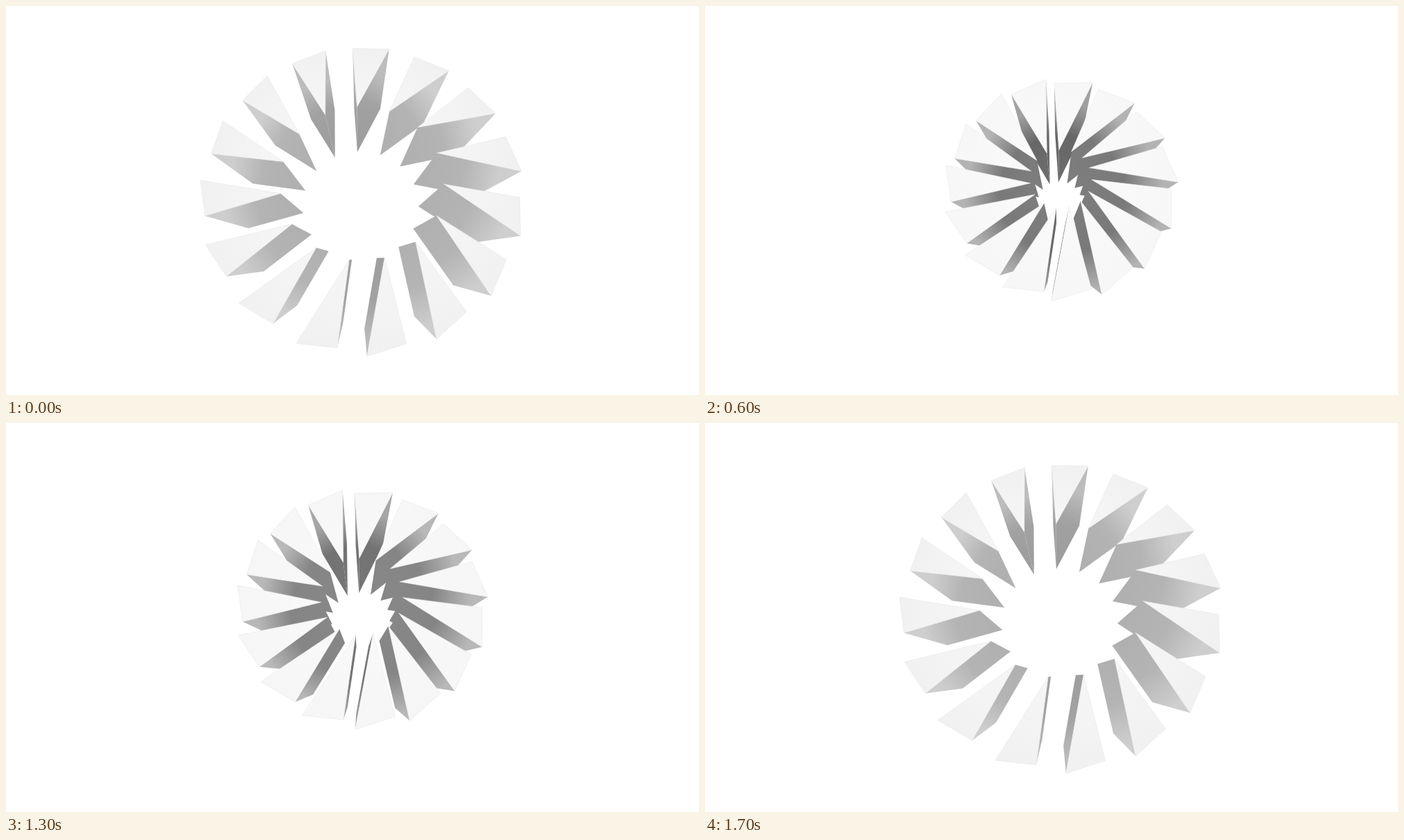
An HTML page with a canvas for the animation above (1.8 s loop, 998 by 561 pixels).

```html
<!DOCTYPE html>
<html lang="en">
<head>
<meta charset="utf-8">
<title>Opening ring of wedges</title>
<style>
  html, body { margin: 0; width: 100%; height: 100%; overflow: hidden; background: #fff; }
  canvas { display: block; }
</style>
</head>
<body>
<canvas id="stage" width="998" height="561"></canvas>
<script>
const ctx = document.getElementById('stage').getContext('2d');
const LOOP = 1800, STEP = 100, STEPS = 7, COUNT = 15;
const RAD = Math.PI / 180;
const START = -93.5;
const NADIR = [507, 365];

// Each ring of corners: closed value, open value
const RINGS = {
  outer: { cy: [253.5, 266.6], rx: [132.3, 227], ry: [124.7, 216.7], p: [0.027, 0.054], depth: 0.716 },
  far:   { cy: [254.8, 267.9], rx: [143.5, 234], ry: [136, 222.3], p: [0.035, 0.064], depth: 0.716 },
  tip:   { cy: [247.2, 251.9], rx: [14.8, 118], ry: [14.2, 110.8], p: [0.006, 0.04], depth: 0.703 }
};

const lerp = (a, b, u) => a + (b - a) * u;
const grey = v => { v = Math.round(v); return `rgb(${v},${v},${v})`; };
const cross = (a, b, c) => (b[0] - a[0]) * (c[1] - a[1]) - (b[1] - a[1]) * (c[0] - a[0]);
const mid = (a, b) => [(a[0] + b[0]) / 2, (a[1] + b[1]) / 2];

function ringPoint(ring, open, degrees) {
  const at = key => lerp(ring[key][0], ring[key][1], open);
  const x = Math.cos(degrees * RAD), y = Math.sin(degrees * RAD);
  const w = 1 - at('p') * y;
  return [512.4 + at('rx') * x / w, at('cy') + at('ry') * y / w];
}

const sink = (pt, k) => pt.map((v, i) => lerp(NADIR[i], v, k));

function wedge(i, open) {
  const angle = START + i * 360 / COUNT;
  const radius = lerp(...RINGS.far.rx, open);
  const spread = Math.asin(lerp(58.4, 55.8, open) / radius) / RAD;
  const p = ringPoint(RINGS.outer, open, angle);
  const q = ringPoint(RINGS.far, open, angle + spread);
  const t = ringPoint(RINGS.tip, open, angle);
  return {
    p, q, t,
    pLow: sink(p, RINGS.outer.depth),
    qLow: sink(q, RINGS.far.depth),
    tLow: sink(t, RINGS.tip.depth)
  };
}

function fillShape(points, fill) {
  ctx.beginPath();
  points.forEach(pt => ctx.lineTo(...pt));
  ctx.closePath();
  ctx.fillStyle = fill;
  ctx.fill();
}

function blend(from, to, shades) {
  const g = ctx.createLinearGradient(...from, ...to);
  shades.forEach((v, i) => g.addColorStop(i / (shades.length - 1), grey(v)));
  return g;
}

function drawSide(tip, rim, rimLow, tipLow, open, dim) {
  const shades = [lerp(104, 176, open), lerp(98, 180, open), lerp(168, 206, open)];
  fillShape([tip, rim, rimLow, tipLow],
    blend(mid(tip, tipLow), mid(rim, rimLow), shades.map(v => v - dim)));
}

function drawSides(w, open, dim) {
  if (cross(w.q, w.t, mid(w.qLow, w.tLow)) < 0) drawSide(w.t, w.q, w.qLow, w.tLow, open, dim);
  if (cross(w.t, w.p, mid(w.pLow, w.tLow)) < 0) drawSide(w.t, w.p, w.pLow, w.tLow, open, dim);
}

function drawTop(w, open) {
  const shades = [lerp(252, 246, open), lerp(250, 241, open)];
  fillShape([w.p, w.q, w.t], blend(w.t, mid(w.p, w.q), shades));
  ctx.strokeStyle = grey(lerp(234, 230, open));
  ctx.lineWidth = 0.6;
  ctx.stroke();
}

// Back of the ring first, then down both flanks to the front
const order = [...Array(COUNT).keys()].sort((a, b) =>
  Math.min(a, COUNT - 0.5 - a) - Math.min(b, COUNT - 0.5 - b));

function draw(step) {
  const open = 1 - step / STEPS;
  const wedges = [...Array(COUNT).keys()].map(i => wedge(i, open));
  ctx.fillStyle = '#fff';
  ctx.fillRect(0, 0, 998, 561);
  for (const i of order) {
    const slit = i === 0 || i === 7 || i === 8 || i === 14;
    drawSides(wedges[i], open, slit ? 18 : 0);
  }
  wedges.forEach(w => drawTop(w, open));
}

const begin = performance.now();
let shown = -1;

function tick() {
  const slot = Math.floor((performance.now() - begin) % LOOP / STEP);
  const step = Math.max(0, Math.min(STEPS, slot - 1, 17 - slot));
  if (step !== shown) draw(shown = step);
  requestAnimationFrame(tick);
}
tick();
</script>
</body>
</html>
```
